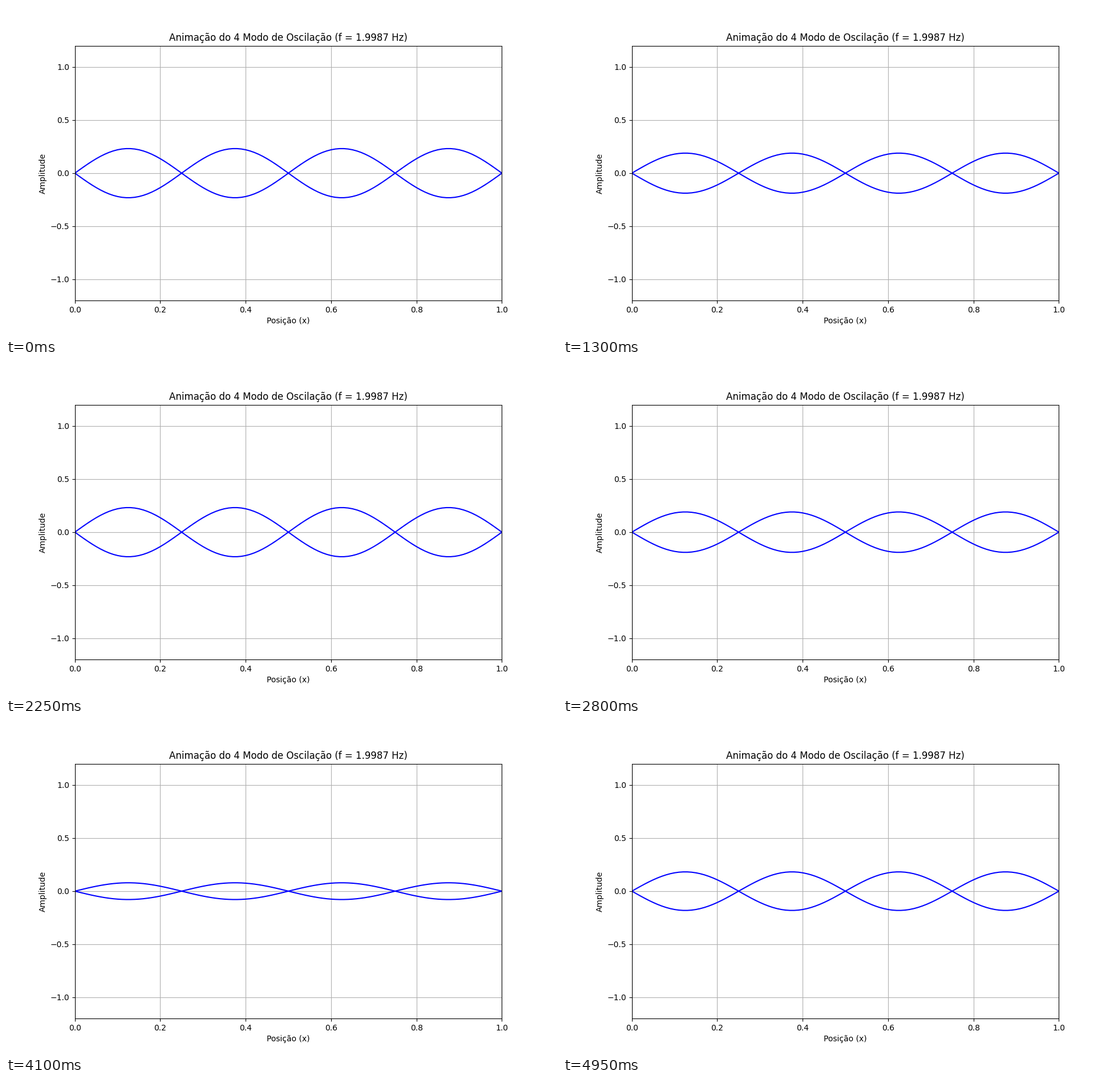
Recreate the animation shown at these times as a matplotlib script. Size 966 px wide and 580 px high, loop 5000 ms.

```python
import matplotlib.pyplot as plt
import numpy as np
from matplotlib.animation import FuncAnimation

MODE = 4
FREQ = 1.9987
PEAK = 0.2315
FRAMES = 100
INTERVAL = 50  # ms

x = np.linspace(0, 1, 101)
shape = PEAK * np.sin(MODE * np.pi * x)

plt.rcParams["font.family"] = "DejaVu Sans"
fig, ax = plt.subplots(figsize=(9.66, 5.8), dpi=100)
ax.set_xlim(0, 1)
ax.set_ylim(-1.2, 1.2)
ax.set_xlabel("Posição (x)")
ax.set_ylabel("Amplitude")
ax.set_title(f"Animação do {MODE} Modo de Oscilação (f = {FREQ:.4f} Hz)")
ax.grid(True)

upper, = ax.plot(x, shape, color="blue", lw=1.5)
lower, = ax.plot(x, -shape, color="blue", lw=1.5)


def update(frame):
    t = frame * INTERVAL / 1000
    y = shape * np.cos(2 * np.pi * FREQ * t)
    upper.set_ydata(y)
    lower.set_ydata(-y)
    return upper, lower


anim = FuncAnimation(fig, update, frames=FRAMES, interval=INTERVAL, repeat=True)
plt.show()
```
